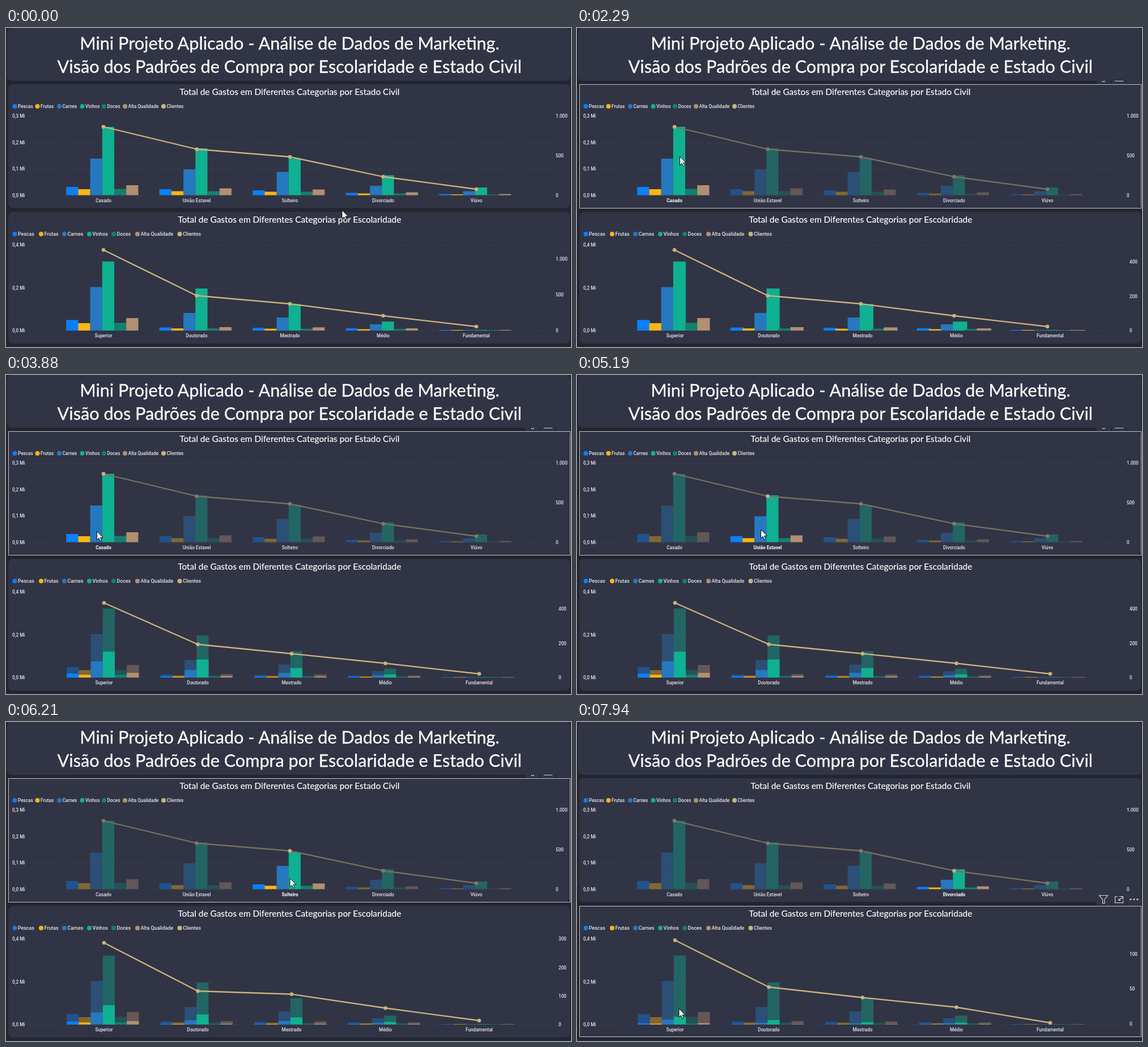
An HTML page that plays this animation: 997 px wide and 562 px high, repeating every 8 s.

```html
<!DOCTYPE html>
<html lang="pt">
<head>
<meta charset="utf-8">
<style>
html, body { margin: 0; width: 100%; height: 100%; overflow: hidden; background: #232530; }
svg { display: block; width: 997px; height: 562px; }
text { fill: #fff; }
.head { font: 30.65px Lato, Carlito, sans-serif; text-anchor: middle; stroke: #fff; stroke-width: 0.3px; }
.title { font: 15.4px Lato, Carlito, sans-serif; text-anchor: middle; stroke: #fff; stroke-width: 0.15px; }
.small { font: 500 8.2px Roboto, sans-serif; fill: #e4e5ea; }
.mid { text-anchor: middle; }
</style>
</head>
<body>
<svg id="stage" viewBox="0 0 997 562"></svg>
<script>
const LOOP = 8000, DIM = 0.4, BAR = 21.2, PANEL = '#313445', TAN = '#cbb27e';
const series = [
  ['Pescas', '#0a80fb'], ['Frutas', '#fcb514'], ['Carnes', '#2678bf'], ['Vinhos', '#10b092'],
  ['Doces', '#13806d'], ['Alta Qualidade', '#b09070'], ['Clientes', TAN]
];
const stage = document.getElementById('stage');

function add(parent, tag, attrs, text) {
  const node = document.createElementNS('http://www.w3.org/2000/svg', tag);
  set(node, attrs);
  if (text !== undefined) node.textContent = text;
  parent.appendChild(node);
  return node;
}
function set(node, attrs) {
  for (const key in attrs) node.setAttribute(key, attrs[key]);
}
const mix = (a, b, k) => a + (b - a) * k;
const clamp = k => Math.max(0, Math.min(1, k));
const ease = k => k * k * (3 - 2 * k);

function label(parent, x, y, text, cls = 'small') {
  return add(parent, 'text', { x, y, class: cls }, text);
}
function panel(x, y, w, h) {
  add(stage, 'rect', { x, y, width: w, height: h, rx: 8, fill: PANEL });
}

const top_ = {
  y: 99, h: 218, frame: 218, base: 294.5, title: 'Total de Gastos em Diferentes Categorias por Estado Civil',
  legend: [15.5, 55.5, 94, 134.5, 173, 210, 278], font: 8.2,
  ticks: [[155, '0,3 Mi'], [201.5, '0,2 Mi'], [248, '0,1 Mi'], [294.5, '0,0 Mi']],
  names: ['Casado', 'União Estavel', 'Solteiro', 'Divorciado', 'Viúvo'],
  bars: [
    [14.5, 10.5, 64.5, 120.5, 11, 17.5], [10.5, 7, 45.5, 82.5, 7, 12], [8.5, 6, 41, 65, 6, 10],
    [4, 3, 16.5, 35, 3, 5], [2, 1.5, 7, 13.5, 1.3, 2]
  ],
  line: [174, 213.5, 227, 262, 284]
};
const bottom = {
  y: 324, h: 232, frame: 230, base: 533, title: 'Total de Gastos em Diferentes Categorias por Escolaridade',
  legend: [15.5, 62, 103, 147, 190, 232, 306.5], font: 8.8,
  ticks: [[382, '0,4 Mi'], [457.5, '0,2 Mi'], [533, '0,0 Mi']],
  names: ['Superior', 'Doutorado', 'Mestrado', 'Médio', 'Fundamental'],
  bars: [
    [18.5, 13, 76.5, 121.5, 13.5, 22], [5.3, 3.7, 31, 74, 3.7, 6], [4.6, 3.2, 23, 46.5, 3.2, 5.5],
    [3.8, 2.3, 11, 15.7, 2.7, 3.8], [1, 1, 1, 1, 1, 1]
  ]
};

// Selections: click time, axis switch, transition span, right axis, line heights, highlighted share
const states = [
  { click: -1, axis: -1, from: -2, to: -1, ticks: [[407, '1.000'], [470, '500'], [533, '0']],
    line: [391, 471.5, 486, 507, 526], share: [1, 1, 1, 1, 1] },
  { click: 2210, axis: 2270, from: 2310, to: 2570, ticks: [[412, '400'], [473, '200'], [533, '0']],
    line: [401.5, 474.5, 491, 508, 526.5], share: [.375, .43, .36, .36, .4] },
  { click: 5180, axis: 5240, from: 5300, to: 5570, ticks: [[382, '300'], [432.5, '200'], [483, '100'], [533, '0']],
    line: [389, 474, 479.5, 504, 526], share: [.28, .24, .27, .29, .3] },
  { click: 6140, axis: 6210, from: 6270, to: 6540, ticks: [[382, '300'], [432.5, '200'], [483, '100'], [533, '0']],
    line: [403.3, 481.3, 493.5, 513, 524], share: [.22, .185, .26, .17, .35] },
  { click: 6990, axis: 7050, from: 7100, to: 7360, ticks: [[409, '100'], [470, '50'], [532, '0']],
    line: [384.5, 467, 485.5, 502.5, 530], share: [.113, .108, .09, .22, .1] }
];

const path = [
  [0, 593, 321], [860, 593, 321], [2060, 181.5, 226.5], [2700, 181.5, 226.5], [3470, 152, 270], [3540, 152, 270],
  [3880, 160.5, 275.5], [4390, 160.5, 275.5], [5060, 324.5, 272.5], [5450, 324.5, 272.5], [6060, 501, 275.5],
  [6780, 501, 275.5], [6980, 666, 281], [7110, 666, 281], [7540, 228, 478], [7940, 180, 505], [LOOP, 180, 505]
];

function buildChart(c) {
  panel(4, c.y, 991, c.h);
  for (const [y, text] of c.ticks) {
    add(stage, 'path', { d: `M42 ${Math.round(y)}.5H964`, stroke: '#505363', 'stroke-dasharray': '1 4' });
    label(stage, 11, y + 3, text);
  }
  label(stage, 500.3, c.y + 19.3, c.title, 'title');
  series.forEach(([name, color], i) => {
    const x = c.legend[i], y = c.y + 39;
    add(stage, 'circle', { cx: x, cy: y, r: 4, fill: color });
    label(stage, x + 5.5, y + 3, name).style.fontSize = c.font + 'px';
  });
  const rects = () => c.bars.map(row => row.map((h, i) => add(stage, 'rect', { fill: series[i][1] })));
  c.dim = rects();
  c.lit = rects();
  c.curve = add(stage, 'polyline', { fill: 'none', stroke: TAN, 'stroke-width': 2.3, 'stroke-linejoin': 'round' });
  c.dots = c.names.map(() => add(stage, 'circle', { r: 3.3, fill: TAN }));
  c.labels = c.names.map(name => label(stage, 0, c.base + 12, name, 'small mid'));
  c.right = add(stage, 'g', {});
}

function setBar(node, x, base, w, h) {
  set(node, { x, y: base - h, width: w, height: h });
}

function drawTop(sel) {
  const c = top_;
  c.names.forEach((name, i) => {
    const on = !sel || sel === i + 1;
    c.lit[i].forEach(n => n.setAttribute('opacity', on ? 1 : DIM));
    c.dots[i].setAttribute('fill', on ? TAN : '#817868');
    c.labels[i].style.fontWeight = sel && on ? 900 : 500;
  });
  c.curve.setAttribute('stroke', sel ? '#777061' : TAN);
}

function drawBottom(t) {
  const c = bottom;
  let n = 0, axis = 0;
  states.forEach((s, i) => {
    if (t >= s.from) n = i;
    if (t >= s.axis) axis = i;
  });
  const now = states[n], old = states[Math.max(0, n - 1)];
  const k = ease(clamp((t - now.from) / (now.to - now.from)));
  const slide = n > 1 ? 1 : n ? k : 0;
  const points = c.names.map((name, i) => {
    const x0 = 172 + 164.5 * i, x1 = axis ? 173 + 165.5 * i : x0, x = mix(x0, x1, slide);
    const y = mix(old.line[i], now.line[i], k), share = mix(old.share[i], now.share[i], k);
    c.bars[i].forEach((h, j) => {
      const shift = BAR * j - 65.8;
      setBar(c.dim[i][j], x1 + shift, c.base, BAR, h);
      setBar(c.lit[i][j], x + shift, c.base, x1 - x + BAR, h * share);
    });
    set(c.dots[i], { cx: x, cy: y });
    c.labels[i].setAttribute('x', x1);
    return x + ',' + y;
  });
  c.curve.setAttribute('points', points.join(' '));
  if (c.axis !== axis) {
    c.axis = axis;
    c.right.textContent = '';
    for (const [y, text] of states[axis].ticks) label(c.right, axis ? 975 : 970, y + 3, text);
  }
}

buildChart(top_);
top_.names.forEach((name, i) => {
  const x = 172 + 164.5 * i;
  top_.bars[i].forEach((h, j) => setBar(top_.lit[i][j], x + BAR * j - 65.8, top_.base, BAR, h));
  top_.dim[i].forEach(n => n.remove());
  set(top_.dots[i], { cx: x, cy: top_.line[i] });
  top_.labels[i].setAttribute('x', x);
});
top_.curve.setAttribute('points', top_.line.map((y, i) => 172 + 164.5 * i + ',' + y).join(' '));
[[155, '1.000'], [225, '500'], [294.5, '0']].forEach(([y, text]) => label(top_.right, 970, y + 3, text));
buildChart(bottom);
bottom.dim.flat().forEach(n => n.setAttribute('opacity', DIM));

// Hover frame with its tool buttons
const frame = add(stage, 'rect', { x: 4.5, width: 991, fill: 'none', stroke: '#c4c5c9' });
const tools = add(stage, 'g', { fill: 'none', stroke: '#d0d1d6', 'stroke-width': 1.2 });
[917, 944, 971].forEach(x => add(tools, 'rect', { x, y: -23, width: 25, height: 22.5, fill: PANEL, stroke: 'none' }));
add(tools, 'path', { d: 'M921.5 -18.5H936.5L931 -11.5V-4.5H927.5V-11.5Z' });
add(tools, 'path', { d: 'M954 -16.5H949.5V-5.5H963.5V-9.5M957 -16.5H963.5V-11M963 -16L956 -9.5M956 -13V-9.5H959.5' });
[977, 983, 989].forEach(cx => add(tools, 'circle', { cx, cy: -11.5, r: 1.6, fill: '#d0d1d6', stroke: 'none' }));

panel(2, 0, 994, 93);
label(stage, 500.5, 37.5, 'Mini Projeto Aplicado - Análise de Dados de Marketing.', 'head');
label(stage, 500.3, 78.5, 'Visão dos Padrões de Compra por Escolaridade e Estado Civil', 'head');

const cursor = add(stage, 'path', {
  d: 'M0 0V15L3.5 11.8 6 17 8.2 16 5.9 10.9H10.8Z', fill: '#fff', stroke: '#000', 'stroke-width': 0.9
});

function cursorAt(t) {
  let i = 1;
  while (t > path[i][0]) i++;
  const a = path[i - 1], b = path[i], k = ease(clamp((t - a[0]) / (b[0] - a[0])));
  return [mix(a[1], b[1], k), mix(a[2], b[2], k)];
}

function render(t) {
  drawTop(states.reduce((sel, s, i) => t >= s.click ? i : sel, 0));
  drawBottom(t);
  const [x, y] = cursorAt(t);
  cursor.setAttribute('transform', `translate(${x} ${y})`);
  const hover = y < 318 ? top_ : y > 324 ? bottom : null;
  frame.style.display = tools.style.display = hover ? '' : 'none';
  if (hover) {
    set(frame, { y: hover.y + 0.5, height: hover.frame });
    tools.setAttribute('transform', `translate(0 ${hover.y})`);
  }
}

const start = performance.now();
function tick() {
  render((performance.now() - start) % LOOP);
  requestAnimationFrame(tick);
}
tick();
</script>
</body>
</html>
```
